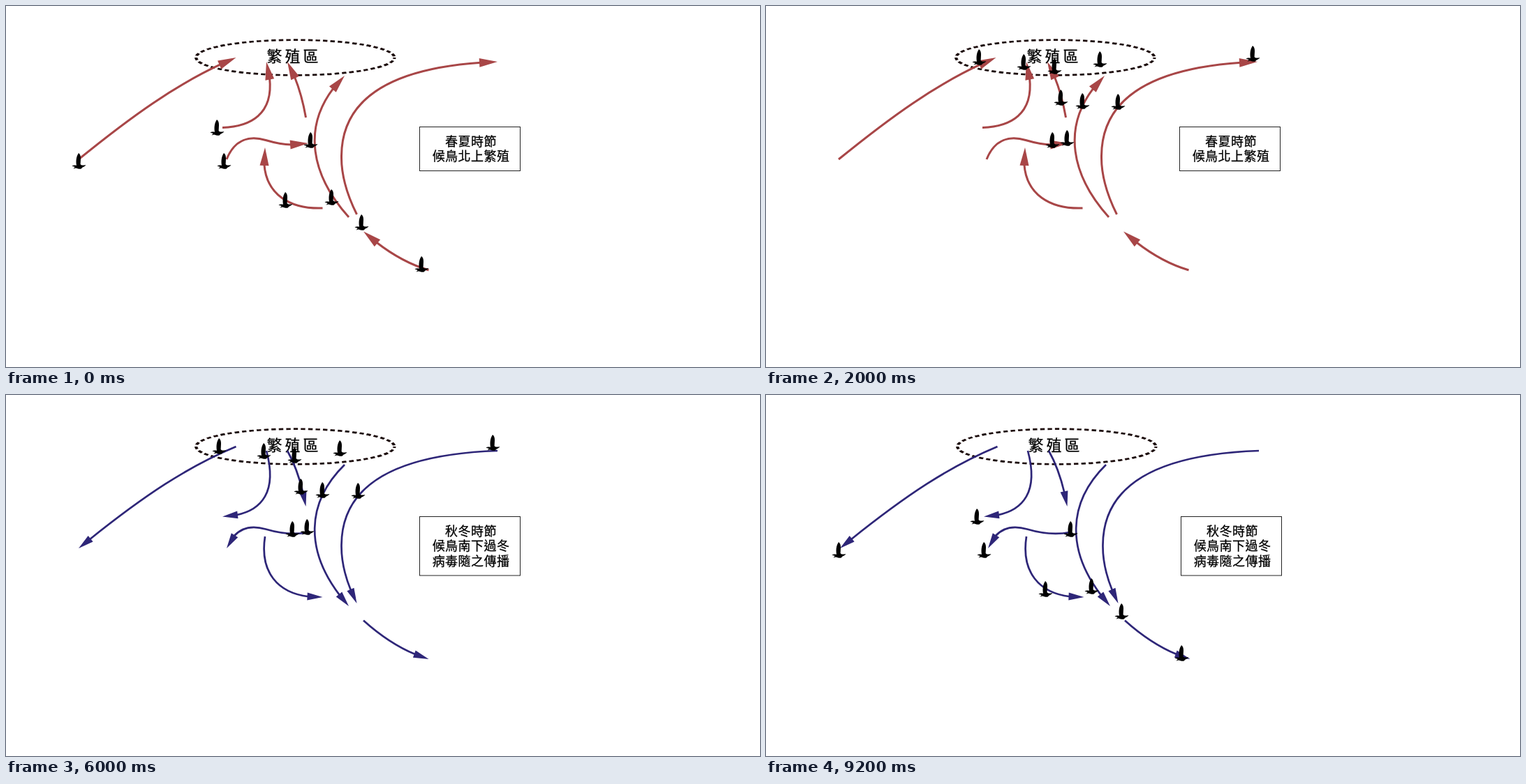
Write an HTML page that moves like this. It is 1080 px wide and 518 px high and loops after 10 s.

```html
<!DOCTYPE html>
<html lang="zh-Hant">
<head>
<meta charset="utf-8">
<title>候鳥遷徙</title>
<style>
  html, body { margin: 0; width: 100%; height: 100%; overflow: hidden; background: #fff; }
  svg { display: block; width: 100%; height: 100%; }
  text {
    font-family: "Noto Sans CJK TC", "Noto Sans CJK", sans-serif; font-size: 18px; letter-spacing: .45px;
    text-anchor: middle; fill: currentColor; stroke: currentColor; stroke-width: .25px;
  }
  .zone { font-size: 22px; letter-spacing: 4px; }
  .box { fill: #fff; stroke: #222; }
  .alert { color: #e01b20; }
</style>
</head>
<body>
<svg viewBox="0 0 1080 518">
  <defs>
    <path id="bird" d="M0 0C2 1.5 3.2 4 3 8L2.6 16C4.5 18.5 7 17 10.5 17.2C9 19.5 6.5 19.5 5 21C4 23.4 1 23.4 -4 21.5L-7.5 22.6L-5.2 20L-9.5 18.6C-7.5 17.2 -5 17.6 -3 17.8C-3.8 13 -4 5.5 0 0Z"/>
    <g id="virus">
      <circle r="8.4" fill="none" stroke="#cf7fd6" stroke-width="4" stroke-dasharray="1 2.3"/>
      <circle r="6.8" fill="#f9b9df"/>
    </g>
  </defs>
  <g id="stage"></g>
</svg>
<script>
const stage = document.getElementById('stage');

// Every route runs from its southern end to its northern end.
const routes = [
  'M104 220C190 150 255 105 329.5 74',
  'M310 174.5C356 173 392 150 373 80',
  'M429.5 160Q421 112 403 80',
  'M491 303C430 235 424 160 485 100',
  'M502.5 299C488 270 480 243 480.5 215C481 143 534 86 704 80',
  'M316 220C328 190 350 186 372 192.5S412 201 433 197',
  'M453.5 290C398 292 362 262 371 203',
  'M605.5 379Q558 365 512 323.5'
];
const north = { color: '#a84647', width: 3, head: 26 };
const south = { color: '#2e2678', width: 2.7, head: 22, reversed: true };

// Birds are placed by the tip of the raised wing, viruses by their centre.
const winterBirds = [[104, 211], [302, 163], [312, 211], [436, 181], [400, 267], [466, 263], [509, 299], [595, 359]];
const summerBirds = [[305, 62], [369, 69], [413, 75], [478, 65], [422, 120], [453, 125], [504, 126], [697, 57], [410, 181], [431, 178]];
const viruses = [[353, 65], [418, 50], [467, 62], [353, 100], [457, 95]];

const place = (id, points) => points.map(([x, y]) => `<use href="#${id}" x="${x}" y="${y}"/>`).join('');

// The line stops inside the head, whose axis joins two points of the route.
function arrow(d, { color, width, head, reversed }) {
  const path = document.createElementNS('http://www.w3.org/2000/svg', 'path');
  path.setAttribute('d', d);
  const length = path.getTotalLength();
  const tip = path.getPointAtLength(reversed ? 0 : length);
  const base = path.getPointAtLength(reversed ? head : length - head);
  const angle = Math.atan2(tip.y - base.y, tip.x - base.x) * 180 / Math.PI;
  const dashes = reversed ? `0 ${head - 2} ${length}` : `${length - head + 2} ${length}`;
  return `<path d="${d}" fill="none" stroke="${color}" stroke-width="${width}" stroke-dasharray="${dashes}"/>
    <path d="M0 0L${-head} ${-head / 4}V${head / 4}Z" fill="${color}"
      transform="translate(${tip.x} ${tip.y}) rotate(${angle})"/>`;
}

function label(x, y, width, padding, lines, style = '') {
  const lineHeight = 21.5;
  const texts = lines.map((line, i) =>
    `<text class="${style}" x="${x + width / 2 + 1.5}" y="${y + padding + 17 + i * lineHeight}">${line}</text>`);
  return `<rect class="box" x="${x}" y="${y}" width="${width}" height="${lines.length * lineHeight + 2 * padding}"/>`
    + texts.join('');
}

const northLabel = label(592.5, 173.5, 144, 10, ['春夏時節', '候鳥北上繁殖']);
const southLabel = label(592.5, 174.5, 144, 10, ['秋冬時節', '候鳥南下過冬', '病毒隨之傳播']);
const infection = place('virus', viruses) + label(464.5, 18.5, 121, 2, ['病毒交叉感染'], 'alert');

// The horizontal scale makes the dashed outline heavier at its sides.
const zone = `<ellipse rx="88.8" ry="25.3" transform="translate(414.3 74) scale(1.6 1)" fill="none"
    stroke="#1c0c0c" stroke-width="2.7" stroke-dasharray="4 2.6" stroke-dashoffset="2"/>
  <text class="zone" x="412.5" y="80">繁殖區</text>`;

const scene = (direction, caption, birds, extra = '', shift = 0) =>
  `<g transform="translate(${shift})">${zone}${routes.map(d => arrow(d, direction)).join('')}${caption}</g>
  ${extra}${place('bird', birds)}`;

const scenes = [
  scene(north, northLabel, winterBirds),
  scene(north, northLabel, summerBirds),
  scene(north, northLabel, summerBirds, infection),
  scene(south, southLabel, summerBirds),
  scene(south, southLabel, winterBirds, '', 2)
];

let shown = -1;
function draw() {
  const index = Math.floor(performance.now() / 2000) % scenes.length;
  if (index !== shown) stage.innerHTML = scenes[shown = index];
  requestAnimationFrame(draw);
}
draw();
</script>
</body>
</html>
```
